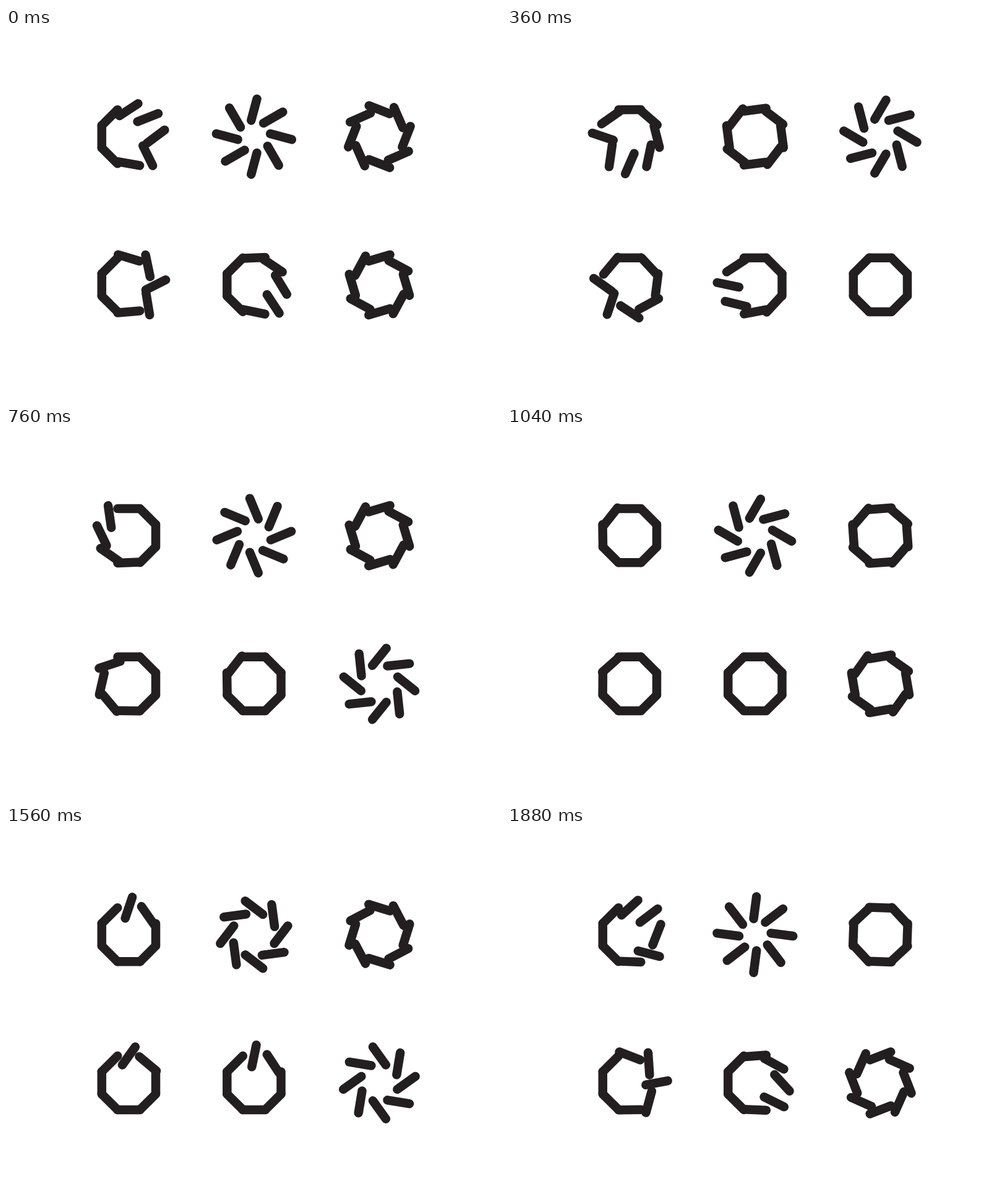
Write an HTML page with a canvas that moves like this. It is 800x600 px and loops after 1.92 s.

```html
<!DOCTYPE html>
<html lang="en">
<head>
<meta charset="utf-8">
<title>Octagon loaders</title>
<style>
html, body { margin: 0; width: 100%; height: 100%; overflow: hidden; background: #fff; }
canvas { display: block; }
</style>
</head>
<body>
<canvas id="stage" width="800" height="600"></canvas>
<script>
const ctx = document.getElementById('stage').getContext('2d');

const LOOP = 1920, FRAME = 40, REST = 1360; // every loader is a closed octagon at REST
const STAGGER = 120;
const APOTHEM = 43.6, HALF = 18, WEIGHT = 14.5;
const COLUMNS = [198.4, 400.9, 603.4], ROWS = [175.7, 415.4];

// Cubic Bezier (1/3, 0, .05, 1), solved for x by bisection.
function ease(x) {
  if (x <= 0) return 0;
  if (x >= 1) return 1;
  let lo = 0, hi = 1;
  for (let i = 0; i < 24; i++) {
    const s = (lo + hi) / 2, r = 1 - s;
    if (s * r * r + 0.15 * s * s * r + s * s * s < x) lo = s;
    else hi = s;
  }
  return lo * lo * (3 - 2 * lo);
}

const halfTurns = t => {
  const u = t / (LOOP / 2), done = Math.floor(u);
  return 180 * (done + ease(u - done));
};
const staggered = (turn, duration) => (t, i) => turn * ease((t - i * STAGGER) / duration);

// Rotation in degrees of bar i, t ms after the closed pose.
const loaders = [
  staggered(360, 960),
  t => 360 * t / LOOP,
  t => 360 * ease(t / LOOP),
  staggered(-180, 960),
  staggered(180, 680),
  halfTurns
];

function drawBar(x, y, i, turn) {
  const side = i * Math.PI / 4, angle = side + turn * Math.PI / 180;
  const cx = x + APOTHEM * Math.sin(side), cy = y - APOTHEM * Math.cos(side);
  const dx = HALF * Math.cos(angle), dy = HALF * Math.sin(angle);
  ctx.beginPath();
  ctx.moveTo(cx - dx, cy - dy);
  ctx.lineTo(cx + dx, cy + dy);
  ctx.stroke();
}

function draw(now) {
  const time = Math.floor((now + 1) / FRAME) * FRAME;
  const t = (time + LOOP - REST) % LOOP;
  ctx.fillStyle = '#fff';
  ctx.fillRect(0, 0, 800, 600);
  ctx.strokeStyle = '#231f20';
  ctx.lineWidth = WEIGHT;
  ctx.lineCap = 'round';
  loaders.forEach((turn, n) => {
    const x = COLUMNS[n % 3], y = ROWS[Math.floor(n / 3)];
    for (let i = 0; i < 8; i++) drawBar(x, y, i, turn(t, i));
  });
}

function tick() {
  draw(performance.now());
  requestAnimationFrame(tick);
}
draw(0);
requestAnimationFrame(tick);
</script>
</body>
</html>
```
